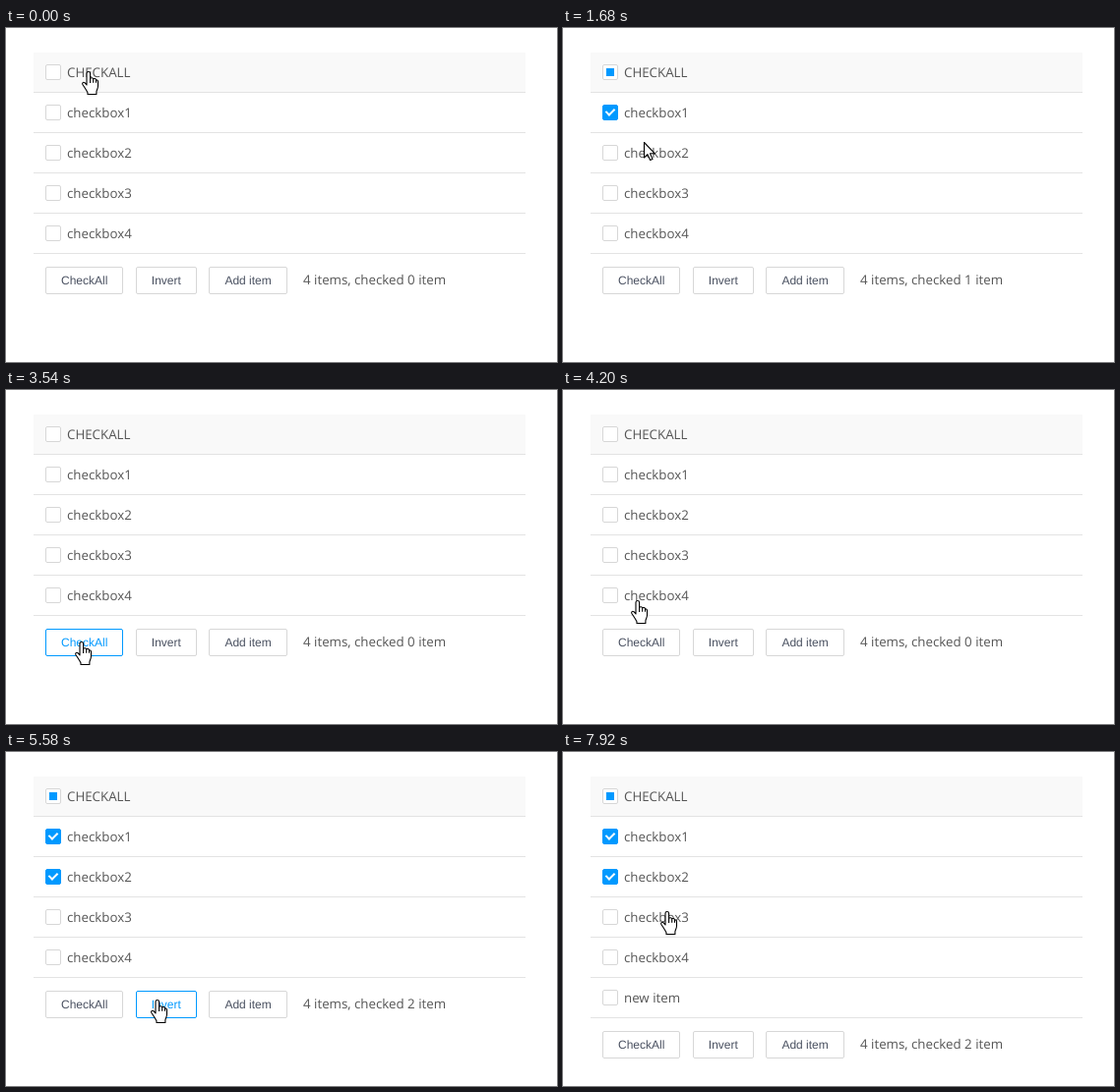
An HTML page for the animation above (8000 ms loop, 560 px wide and 340 px high).

```html
<!DOCTYPE html>
<html lang="en">
<head>
<meta charset="utf-8">
<title>Checkbox list</title>
<style>
  html, body { margin: 0; width: 100%; height: 100%; overflow: hidden; background: #fff; }
  #panel {
    position: absolute; left: 28px; top: 25px; width: 500px;
    font: 13.3px "Open Sans", "Noto Sans", sans-serif; color: #555;
    text-rendering: geometricPrecision; white-space: nowrap;
  }
  .row {
    display: flex; align-items: center; height: 40px; padding-left: 12px;
    line-height: 40px; border-bottom: 1px solid #e3e3e3;
  }
  .row:first-child { background: #f9f9f9; }
  .row[hidden] { display: none; }
  .box {
    position: relative; box-sizing: border-box; width: 16px; height: 16px; margin-right: 6px;
    background: #fff; border: 1px solid #d7d7d7; border-radius: 2px;
  }
  .partial::after {
    content: ""; position: absolute; left: 3px; top: 3px; width: 8px; height: 8px; background: #09f;
  }
  .checked { background: #09f; border-color: #09f; }
  .checked::after {
    content: ""; position: absolute; left: 4px; top: 1px; width: 4px; height: 7px;
    border: solid #fff; border-width: 0 2px 2px 0; transform: rotate(45deg);
  }
  #footer { display: flex; gap: 12.5px; margin: 13px 12px; line-height: 26px; }
  .button {
    padding: 0 15px; border: 1px solid #d7d7d7; border-radius: 2px;
    font: 12px/26px "Liberation Sans", Arial, sans-serif; color: #495060;
  }
  .hover { border-color: #09f; color: #09f; }
  #status { margin-left: 3.8px; }
  #pointer { position: absolute; left: 0; top: 0; overflow: visible; }
</style>
</head>
<body>
<div id="panel">
  <div id="footer"><span id="status"></span></div>
</div>
<svg id="pointer" width="20" height="26"><path fill="#fff" stroke="#000" stroke-width="1.1" stroke-linejoin="round"/></svg>
<script>
const LOOP = 8000, STEP = 60;
const FIRST_ROW = 45, ROW = 41;

// Pointer stops: x, y, arrival, click, departure (at the click unless given)
const START = [83, 44];
const stops = [
  [79, 45, 120, 300], [79, 45, 900, 960, 1020],
  [83, 84, 1260, 1500], [81, 133, 1800, 1980], [78, 168, 2160, 2400], [76, 208, 2640, 2820],
  [76, 256, 3060, 3540, 3900], [75, 214, 4200, 4440], [86, 168, 4560, 4860, 4980],
  [153, 252, 5340, 5580, 6600], [244, 256, 6720, 6960, 7380], [105, 162, 7920, LOOP]
];

const HAND = 'M5 14V2.3a1.8 1.8 0 0 1 3.6 0V7.2c1-.8 2.7-.6 3.1 .6c1.1-.7 2.5-.2 2.8 1c1.1-.3 2 .5 2 1.6V15' +
  'c0 3-1.6 4.2-1.6 6.3v2.2H6v-1.8C4.5 19 3 16.8 .9 13.5c-.9-1.6 .7-2.8 2.1-1.8Z' +
  'M8.6 7.2v4.8M11.7 7.8v4M14.5 8.8v3';
const ARROW = 'M.5 .5V16L4 12.6L6.6 18.5L9 17.4L6.5 11.8H11.4Z';

const footer = document.getElementById('footer');
const status = document.getElementById('status');
const pointer = document.getElementById('pointer');

function add(before, className, html) {
  const element = document.createElement('div');
  element.className = className;
  element.innerHTML = html;
  before.before(element);
  return element;
}

const names = ['CHECKALL', ...[1, 2, 3, 4].map(n => 'checkbox' + n), 'new item'];
const rows = names.map(name => add(footer, 'row', `<span class="box"></span>${name}`));
const buttons = ['CheckAll', 'Invert', 'Add item'].map(name => add(status, 'button', name));

const toggleAll = state => state.items.fill(!state.items.every(Boolean));
const actions = {
  CheckAll: toggleAll,
  Invert: state => state.items = state.items.map(on => !on),
  'Add item': state => state.added = true
};

// Row number or button name under a point
function hit(x, y, added) {
  const rowCount = added ? 6 : 5;
  const row = Math.round((y - FIRST_ROW) / ROW);
  const onLabel = x >= 40 && x < 128 && Math.abs(y - FIRST_ROW - row * ROW) <= 8;
  if (row < rowCount && onLabel) return row;
  const top = FIRST_ROW + rowCount * ROW - 7;
  if (y < top || y >= top + 28) return null;
  const button = buttons.find(b => {
    const { left, right } = b.getBoundingClientRect();
    return x >= left && x < right;
  });
  return button ? button.textContent : null;
}

function click(state) {
  const { target, items } = state;
  if (target === 0) toggleAll(state);
  else if (target > 0) items[target - 1] = !items[target - 1];
  else if (target) actions[target](state);
}

// Replays the pointer's stops up to time t
function stateAt(t) {
  let [x, y] = START, departed = 0;
  const state = { items: Array(4).fill(false), added: false, target: hit(x, y, false) };
  for (const [toX, toY, arrive, clicked, leave = clicked] of stops) {
    if (t <= departed) break;
    const p = Math.min(1, (t - departed) / (arrive - departed));
    const eased = p * p * (3 - 2 * p);
    x += (toX - x) * eased;
    y += (toY - y) * eased;
    state.target = hit(x, y, state.added);
    if (t >= clicked) click(state);
    departed = leave;
  }
  return { ...state, x: Math.round(x), y: Math.round(y) };
}

function draw(t) {
  const { items, added, target, x, y } = stateAt(t);
  const count = items.filter(Boolean).length;
  const header = count === items.length ? 'checked' : count ? 'partial' : '';
  rows.forEach((row, i) => {
    row.firstChild.className = 'box ' + (i ? items[i - 1] ? 'checked' : '' : header);
  });
  rows.at(-1).hidden = !added;
  buttons.forEach(b => b.classList.toggle('hover', b.textContent === target));
  status.textContent = `4 items, checked ${count} item`;

  const hand = target !== null;
  pointer.firstChild.setAttribute('d', hand ? HAND : ARROW);
  pointer.style.transform = `translate(${hand ? x - 6 : x}px, ${y}px)`;
}

let shown = -1;
function tick() {
  const t = Math.floor(performance.now() % LOOP / STEP) * STEP;
  if (t !== shown) draw(shown = t);
  requestAnimationFrame(tick);
}
tick();
</script>
</body>
</html>
```
